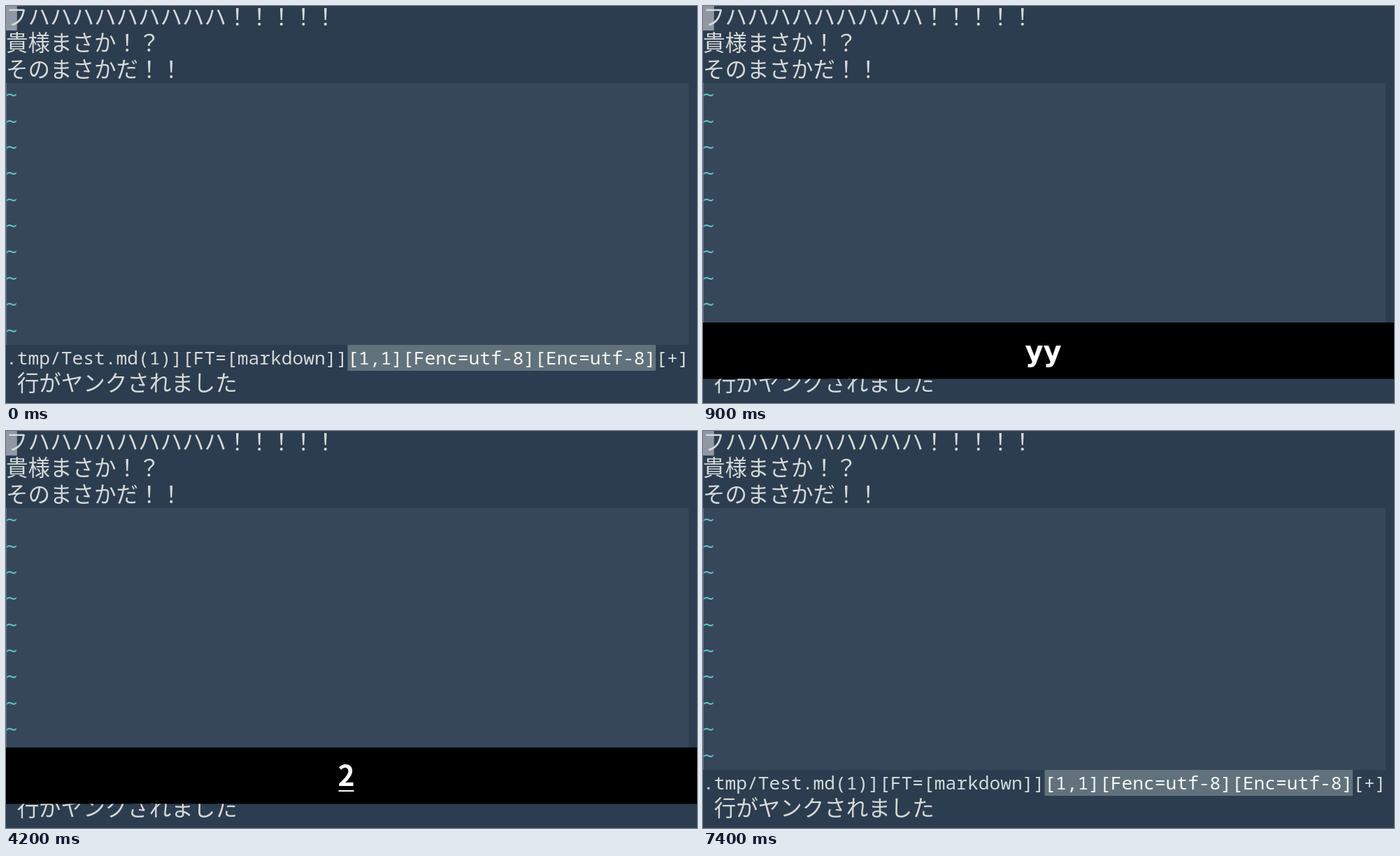
Recreate the animation shown at these times as an HTML page. Size 988 by 567 pixels, loop 8000 ms.

```html
<!DOCTYPE html>
<html lang="ja">
<head>
<meta charset="utf-8">
<style>
  html, body { margin: 0; width: 100%; height: 100%; overflow: hidden; background: #2c3d4f; }
  svg { display: block; width: 988px; height: 567px; }
  text { white-space: pre; fill: #d5d9d9; }
  .wide { font: 31.5px "Noto Sans CJK JP", "Noto Sans CJK", sans-serif; }
  .mono { font: 26.25px "Noto Sans Mono", monospace; }
  .tilde { font: 26.25px "DejaVu Sans Mono", monospace; fill: #5cc3d0; }
  .bright { fill: #f5f7f5; }
  .keys { font: bold 40px "DejaVu Sans", sans-serif; fill: #fff; text-anchor: middle; }
  .keys.digit { font: bold 41px "Noto Sans CJK JP", "Noto Sans CJK", sans-serif; }
</style>
</head>
<body>
<svg viewBox="0 0 988 567"></svg>
<script>
const svg = document.querySelector('svg');
const CELL = 15.75, ROW = 37.38, TOP = -2, BASE = 28;
const KEY_X = 486.5, KEY_W = 26;
const LOOP = 8000;

const rowTop = row => TOP + row * ROW;

function add(tag, attrs, text = '') {
  const el = document.createElementNS('http://www.w3.org/2000/svg', tag);
  for (const name in attrs) el.setAttribute(name, attrs[name]);
  el.textContent = text;
  return svg.appendChild(el);
}
const rect = (x, y, width, height, fill) => add('rect', { x, y, width, height, fill });
const write = (cls, col, row, text, dy = 0) =>
  add('text', { class: cls, x: col * CELL, y: rowTop(row) + BASE + dy }, text);
const show = (el, on) => el.style.display = on ? '' : 'none';

// Editor window
const lines = ['フハハハハハハハハハ！！！！！', '貴様まさか！？', 'そのまさかだ！！'];
rect(0, 0, 988, 567, '#2c3d4f');
rect(0, 110, 976, 374, '#364759');
rect(0, 110, 1, 374, '#65717d');
const flashes = lines.slice(0, 2).map((line, i) =>
  rect(0, rowTop(i), line.length * CELL * 2, ROW, '#13354a'));
const cursor = rect(0, 0, 15.75, 35, '#9098a3');
lines.forEach((line, i) => write('wide', 0, i, line, 1));
for (let row = 3; row < 13; row++) write('tilde', 0, row, '~', -3);

// Status and command lines
rect(488.5, 484, 440.5, 37, '#62727c');
write('mono', 0, 13, '.tmp/Test.md(1)][FT=[markdown]]');
write('mono bright', 31, 13, '[1,1][Fenc=utf-8][Enc=utf-8]');
write('mono', 59, 13, '[+]');
write('wide', 1, 14, '行がヤンクされました', 1);
const pending = write('mono', 51, 14, '');

// Key display
const bar = rect(0, 452, 988, 80.5, '#000');
const keys = add('text', { class: 'keys', x: KEY_X, y: 507 });
const underline = rect(0, 509, KEY_W, 2, '#fff');

// start, typed keys, pending command, underlined, flashed lines
const steps = [
  [0, '', '', false, 0],
  [500, 'y', 'y', true, 0],
  [700, 'yy', '', true, 1],
  [900, 'yy', '', false, 0],
  [3200, '', '', false, 0],
  [4200, '2', '', true, 0],
  [4300, '2', '2', true, 0],
  [4600, '2y', '2y', true, 0],
  [4800, '2yy', '2y', true, 0],
  [4900, '2yy', '', true, 2],
  [5100, '2yy', '', false, 0],
  [7400, '', '', false, 0],
];

// Only the last typed key is underlined; a lone digit uses a narrower font.
function placeUnderline(typed) {
  const digit = typed === '2';
  const width = digit ? 22 : KEY_W;
  const textWidth = typed.length * width + (!digit && typed.startsWith('2') ? 1.8 : 0);
  underline.setAttribute('x', KEY_X + textWidth / 2 - width);
  underline.setAttribute('y', digit ? 513 : 509);
  underline.setAttribute('width', width);
}

let current;
function frame(now) {
  const time = now % LOOP;
  const step = steps.findLast(s => s[0] <= time);
  if (step !== current) {
    current = step;
    const [, typed, command, underlined, flashed] = step;
    show(bar, typed);
    keys.textContent = typed;
    keys.classList.toggle('digit', typed === '2');
    placeUnderline(typed);
    show(underline, underlined);
    pending.textContent = command;
    flashes.forEach((flash, i) => show(flash, i < flashed));
    show(cursor, !flashed);
  }
  requestAnimationFrame(frame);
}
frame(0);
</script>
</body>
</html>
```
